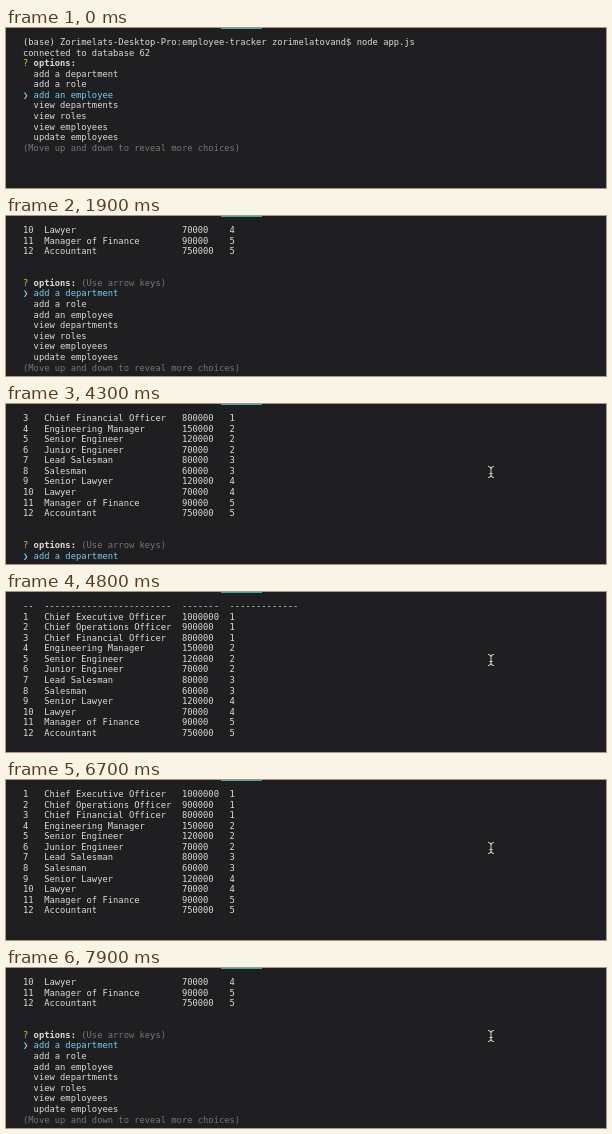
Recreate the animation shown at these times as an HTML page. Size 600 by 160 pixels, loop 8 s.

```html
<!DOCTYPE html>
<html lang="en">
<head>
<meta charset="utf-8">
<title>Employee tracker in a terminal</title>
<style>
  html, body { margin: 0; width: 100%; height: 100%; overflow: hidden; background: #1f1e20; }
  #tab { position: absolute; left: 215px; top: 0; width: 41px; height: 1px; background: #38a9a6; }
  #screen {
    position: absolute; left: 17px; top: 9px; margin: 0; height: 149px; overflow: hidden;
    font: 8.8px/10.58px "DejaVu Sans Mono", monospace; color: #dcdcdc;
  }
  .mark { color: #cdcb4b; }
  .pick { color: #74cdf0; }
  .dim { color: #777678; }
  #pointer { position: absolute; left: -5px; top: -7px; fill: none; stroke: #d4d4d4; stroke-width: 1; }
</style>
</head>
<body>
<div id="tab"></div>
<pre id="screen"></pre>
<svg id="pointer" width="10" height="14"><path d="M2 1.5Q5 1.5 5 3.5Q5 1.5 8 1.5M5 3V11M2 12.5Q5 12.5 5 10.5Q5 12.5 8 12.5M3.5 8.5H6.5"/></svg>
<script>
const LOOP = 8000, ROWS = 14;
const screen_ = document.getElementById('screen');
const pointer = document.getElementById('pointer');

const span = (cls, text) => `<span class="${cls}">${text}</span>`;
const prompt_ = rest => `${span('mark', '?')} <b>options:</b> ${rest}`;

const choices = ['add a department', 'add a role', 'add an employee', 'view departments',
  'view roles', 'view employees', 'update employees', 'exit'];

// Seven choices are visible; the arrow stops in the middle and the list moves on.
function menu(selected) {
  const first = Math.max(0, selected - 3);
  const items = choices.slice(first, first + 7).map((text, i) =>
    first + i === selected ? span('pick', '❯ ' + text) : '  ' + text);
  return [...items, span('dim', '(Move up and down to reveal more choices)')];
}

const tableRow = (id, title, salary, dept) =>
  String(id).padEnd(4) + title.padEnd(26) + String(salary).padEnd(9) + dept;

const roles = [
  ['Chief Executive Officer', 1000000, 1], ['Chief Operations Officer', 900000, 1],
  ['Chief Financial Officer', 800000, 1], ['Engineering Manager', 150000, 2],
  ['Senior Engineer', 120000, 2], ['Junior Engineer', 70000, 2],
  ['Lead Salesman', 80000, 3], ['Salesman', 60000, 3],
  ['Senior Lawyer', 120000, 4], ['Lawyer', 70000, 4],
  ['Manager of Finance', 90000, 5], ['Accountant', 750000, 5]
];

const start = [
  '(base) Zorimelats-Desktop-Pro:employee-tracker zorimelatovand$ node app.js',
  'connected to database 62'
];
const HEADER = 3;
const finished = [
  ...start,
  prompt_(span('pick', 'view roles')),
  tableRow('id', 'title', 'salary', 'department_id'),
  tableRow('--', '-'.repeat(24), '-'.repeat(7), '-'.repeat(13)),
  ...roles.map((role, i) => tableRow(i + 1, ...role)),
  '', '',
  prompt_(span('dim', '(Use arrow keys)')),
  ...menu(0)
];

// [time, lines scrolled past the table header]
const scrolls = [
  [1000, 11], [3300, 10], [3500, 9], [3600, 8], [3700, 7],
  [4100, 6], [4200, 5], [4300, 4], [4400, 3], [4500, 2], [4700, 1],
  [5200, 0], [5300, -1], [6100, 0], [6500, 1],
  [6700, 2], [6800, 3], [6900, 4], [7000, 5], [7100, 6],
  [7200, 8], [7300, 9], [7400, 10], [7500, 11]
];

// [time, x, y]
const path = [[2500, 564, 60], [2800, 564, 72], [3200, 485.5, 66], [3600, 485.5, 66], [3700, 485, 68]];

function visibleLines(t) {
  if (t < 1000) return [...start, prompt_(''), ...menu(t < 100 ? 2 : t < 200 ? 3 : 4)];
  const top = HEADER + scrolls.findLast(([at]) => at <= t)[1];
  return finished.slice(top, top + ROWS);
}

function pointerAt(t) {
  const next = path.findIndex(([at]) => at > t);
  if (next < 0) return path[path.length - 1].slice(1);
  const [t0, x0, y0] = path[next - 1], [t1, x1, y1] = path[next];
  const k = (t - t0) / (t1 - t0), ease = k * k * (3 - 2 * k);
  return [x0 + (x1 - x0) * ease, y0 + (y1 - y0) * ease];
}

let shown = '';
function draw() {
  const t = performance.now() % LOOP;
  const html = visibleLines(t).join('\n');
  if (html !== shown) screen_.innerHTML = shown = html;

  const visible = t >= path[0][0];
  pointer.style.display = visible ? 'block' : 'none';
  if (visible) {
    const [x, y] = pointerAt(t);
    pointer.style.transform = `translate(${x}px, ${y}px)`;
  }
  requestAnimationFrame(draw);
}
draw();
</script>
</body>
</html>
```
